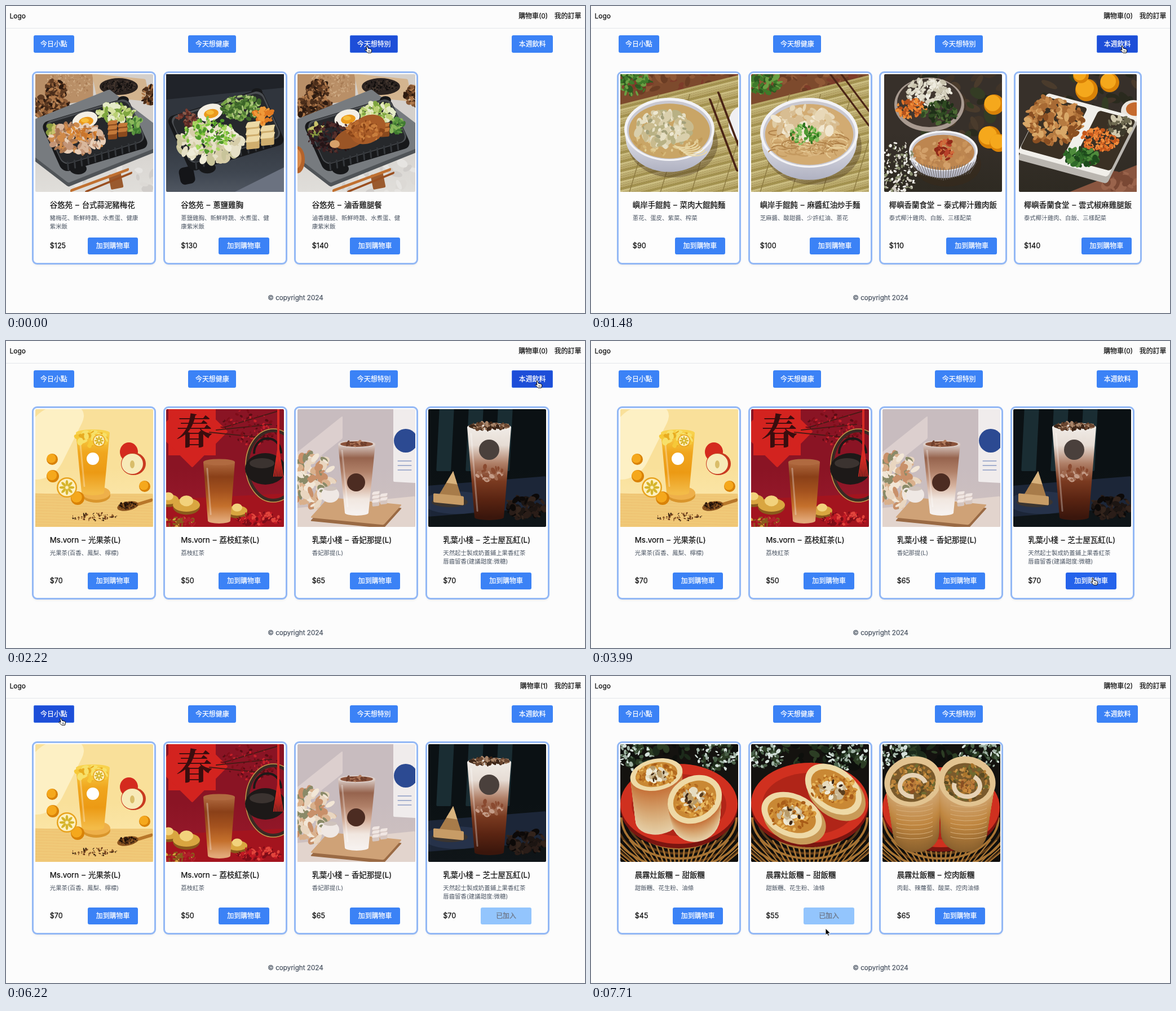
These frames come from a looping animation (1027x545 px, 8000 ms). An HTML page with a canvas:

```html
<!DOCTYPE html>
<html lang="zh-Hans">
<head>
<meta charset="utf-8">
<title>點餐</title>
<style>
html, body { margin: 0; width: 100%; height: 100%; overflow: hidden; background: #fcfcfc; }
* { box-sizing: border-box; }
#stage { position: fixed; inset: 0; overflow: hidden; color: #111; white-space: pre;
  font: 400 11.94px/20px Inter, "Noto Sans CJK SC", "Noto Sans CJK TC", sans-serif; -webkit-text-stroke: .25px; }
#stage.flat { background: linear-gradient(#fcfcfc 115px, #fff 115px); }
header { position: absolute; inset: 0 0 auto; height: 40px; padding: 7.5px 6.5px; display: flex; gap: 11.5px; border-bottom: 1px solid #e5e7eb; }
header :first-child { flex: 1; }
nav { position: absolute; left: 48.5px; width: 921.5px; top: 51.5px; display: flex; justify-content: space-between; }
.btn { background: #3b82f6; color: #fff; border-radius: 3px; text-align: center; }
nav .btn { padding: 0 12.5px; line-height: 31px; }
nav .on { background: #1d4ed8; box-shadow: inset 0 0 0 1px #3b6fe4; }
.row { display: flex; gap: 12.5px; margin: 115.5px 0 0 46px; }
.card { display: flex; flex-direction: column; align-items: center; min-width: 220px; padding: 2.5px 14.75px 15px;
  border: 3px solid #93b8f5; border-radius: 9px; background: #fdfdfd; box-shadow: 0 3px 4px -2px rgba(0,0,0,.08); }
.card canvas { margin: 0 -14.75px; }
.flat canvas { display: none; }
.info { min-width: 156.6px; }
.title { font-size: 13.43px; margin-top: 12.5px; word-spacing: 1.2px; }
.desc { font-size: 10.44px; line-height: 15px; height: 30px; margin: 6.5px 0 12px; color: #4b5563; -webkit-text-stroke: 0; }
.buy { display: flex; justify-content: space-between; line-height: 29.5px; }
.price { font-size: 12.6px; }
.buy .btn { width: 89.5px; }
.buy .on { background: #2563eb; }
.buy .done { background: #93c5fd; color: #6b7280; }
footer { margin-top: 21.5px; line-height: 77px; text-align: center; color: #4b5563; font-size: 11.7px; }
.flat footer { background: #f3f4f6; }
#tip { position: absolute; left: 0; top: 0; }
#tip svg { position: absolute; overflow: visible; }
</style>
</head>
<body>
<div id="stage"></div>
<script>
const stage = document.getElementById('stage');

function add(parent, tag, cls, text = '') {
  const el = document.createElement(tag);
  el.className = cls;
  el.textContent = text;
  parent.append(el);
  return el;
}

// ---- drawing helpers for the photos ----
const N = 209;
let c, seed;
const rnd = () => (seed = (seed * 16807) % 2147483647) / 2147483647;
const times = (n, f) => { for (let i = 0; i < n; i++) f(i); };
function E(fill, x, y, a, b = a, r = 0) {
  c.fillStyle = fill;
  c.beginPath();
  c.ellipse(x, y, a, b, r, 0, 7);
  c.fill();
}
// rounded box around x,y; ky and kx slant its sides
function Q(fill, x, y, w, h, ky = 0, kx = 0, round = 2) {
  c.save();
  c.transform(1, ky, kx, 1, x, y);
  c.fillStyle = fill;
  c.beginPath();
  c.roundRect(-w / 2, -h / 2, w, h, round);
  c.fill();
  c.restore();
}
function O(color, w, x, y, a, b = a, from = 0, to = 7) {
  c.strokeStyle = color;
  c.lineWidth = w;
  c.beginPath();
  c.ellipse(x, y, a, b, 0, from, to);
  c.stroke();
}
// scatter of small flecks inside an ellipse
function S(n, x, y, a, b, size, ...cols) {
  times(n, i => {
    const q = rnd() * 6.28, d = Math.sqrt(rnd()), s = size * (.5 + rnd() * .7);
    E(cols[i % cols.length], x + Math.cos(q) * a * d, y + Math.sin(q) * b * d, s, s * (.3 + rnd() * .5), rnd() * 3);
  });
}
function G(y0, y1, ...cols) {
  const g = c.createLinearGradient(0, y0, 0, y1);
  cols.forEach((k, i) => g.addColorStop(i / (cols.length - 1), k));
  return g;
}
const bg = (...cols) => Q(G(0, N, ...cols, cols[0]), N / 2, N / 2, N, N);
const fruit = (x, y, r) => { E('#d98207', x, y, r); E('#f5a81c', x - r * .15, y - r * .15, r * .8); };

// ---- boxed meals ----
const egg = (x, y) => {
  E('#f4efe4', x, y, 23, 15, -.3);
  E('#eb9a1c', x + 2, y + 2, 13, 8, -.2);
  E('#f6bd3c', x, y, 7, 4);
};
const cubes = (x, y, s, top, side) => times(5, i => {
  const cx = x + (i % 2 - .5) * s * 2, cy = y + (i - 2) * s * .5;
  Q(side, cx, cy, s * 1.8, s * 1.5, -.1);
  Q(top, cx, cy - s * .6, s * 1.8, s * .8, -.1, -.4);
});
function tray(x, y, k) {
  const q = (fill, dy, w, h) => Q(fill, x, y + dy, w * k, h * k, -.3, .45, 12);
  E('#17181a', x + 50 * k, y - 60 * k, 10, 7);
  E('#17181a', x - 30 * k, y + 62 * k, 15, 10);
  q('#17181a', 2, 154, 88);
  q('#4a4d51', -4, 148, 76);
  q('#26282b', -3, 144, 72);
  times(11, i => Q('#34373b', x + (i * 12 - 48) * k, y + (57 - i * 3.6) * k, 3, 16, 0, .1));
}
function desk() {
  bg('#d4d0cc', '#e0deda');
  S(40, 150, 170, 90, 50, 10, '#e6e4e1', '#d0cdca', '#dcd9d5');
  Q('#b98f67', 40, 20, 125, 70, -.15);
  S(150, 60, 18, 42, 22, 2, '#a87c55', '#caa57e', '#d0ae88');
  Q('#d3b48f', 152, 24, 95, 40, .1, .2);
  E('#2b2320', 148, 22, 34, 15);
  S(120, 148, 21, 29, 10, 2, '#0f0d0c', '#43362e');
  times(4, i => S(110, [36, 12, 43, 209][i], [28, 58, 60, 38][i], 18, 18, 5, '#4a2d1a', '#8a5a36', '#5d3a22', '#b07a4c', '#2c1a10'));
  Q('#505458', 95, 117, 190, 90, -.4, 1.3);
  Q('#777b7f', 95, 110, 190, 90, -.4, 1.3);
  Q('#9a5a2e', 143, 190, 22, 26, -.2, .2);
  Q('#c07030', 114, 188, 104, 5, -.37);
  Q('#9a4f20', 130, 192, 84, 4, -.41);
  tray(106, 106, 1);
  S(90, 142, 68, 32, 16, 6, '#b9cf72', '#d7e2a0', '#7fa63f', '#e6ebc8');
  S(50, 176, 90, 14, 14, 5, '#3f7a30', '#5a9440', '#8ab85a');
  cubes(146, 100, 9, '#c47a3a', '#8a4a1e');
  S(20, 34, 100, 13, 10, 6, '#c8c06a', '#8a9a40');
}
function pork() {
  desk();
  egg(88, 82);
  S(190, 74, 114, 48, 26, 7, '#d9b79c', '#c39577', '#e8cfb8', '#a9754f', '#cf8a4a');
  S(40, 82, 104, 26, 12, 4, '#c8742c', '#dd8e3a');
}
function leg() {
  desk();
  E('#b4632b', 0, 152, 13, 24);
  E('#d98a4a', -3, 150, 10, 18);
  egg(88, 78);
  S(200, 64, 112, 46, 26, 4, '#3a1f22', '#55302c', '#241416');
  E('#9a5526', 95, 113, 32, 17, -.4);
  E('#a85c28', 125, 98, 33, 24, -.5);
  S(110, 118, 101, 32, 18, 5, '#8a4519', '#b96a2e', '#c97e3d', '#a85c28');
  E('#d6a06a', 66, 124, 9, 7);
}
function breast() {
  bg('#30353d', '#3f4650', '#5f6672');
  Q('#6b7280', 190, 200, 150, 50, -.5);
  Q('#202329', 100, 10, 230, 50, -.1);
  Q('#141518', 37, 180, 26, 30, -.2, .2, 8);
  tray(106, 98, 1.1);
  S(60, 38, 78, 18, 14, 4, '#5a2a24', '#7a3c30', '#8a5a4a');
  egg(78, 68);
  S(160, 134, 60, 36, 22, 5, '#4f7a34', '#7aa64a', '#3c6428', '#a9c478');
  S(30, 172, 74, 17, 15, 7, '#e07a22', '#f09a3a');
  cubes(167, 110, 13, '#ecd9a6', '#cfae6e');
  S(150, 76, 122, 56, 34, 9, '#e6e0c6', '#d6cda8', '#f0ecd8', '#c8c49a');
  S(120, 76, 108, 46, 30, 4, '#7fc23c', '#a8d860', '#4f962a');
}

// ---- noodles and rice ----
function mat() {
  bg('#7d4a2d', '#6b3d24');
  S(60, 120, 15, 100, 28, 9, '#6b3d24', '#8f5836', '#7d3c2a');
  times(60, i => Q(['#b7a768', '#a3934f', '#cabd80', '#bcae70'][i % 4], 104, 30 + i * 4, 230, 4.2, -.25));
  times(4, i => Q('#8d7b42', 40 + i * 55, 130, 1.5, 190, 0, -.3));
  S(90, 18, 12, 36, 24, 6, '#3f7a2a', '#6aa043', '#2d5a20');
}
function bowl(x, y, a, b, fill) {
  E('rgba(60,40,20,.35)', x + 6, y + 24, a, b * 1.1);
  E(G(y, y + b * 1.5, '#e9e9f0', '#a9abbc'), x, y + b * .25, a * .97, b * 1.1);
  E('#f3f3f6', x, y, a, b);
  E('#c9c8d0', x, y + 1, a * .94, b * .93);
  E(fill, x, y + 3, a * .9, b * .87);
}
function soup() {
  mat();
  E('#f0eff2', 214, 88, 22, 30);
  times(2, i => Q('#4a2416', 183 + i * 15, 108 - i * 12, 4, 130, 0, .38));
  bowl(87, 98, 80, 56, '#c9a566');
  S(60, 85, 120, 60, 22, 5, '#e0cb94', '#d5b878', '#c19a58');
  S(110, 76, 96, 46, 30, 10, '#d9cfac', '#c9bb8e', '#e6dfc4', '#b8b184');
  S(30, 80, 90, 42, 24, 4, '#a3a07a', '#eee8d2');
  times(6, i => O('#ead9a8', 2, 112 + i * 4, 120 + i * 3, 22, 10, .2, 2.4));
}
function noodles() {
  mat();
  times(2, i => Q('#4a2416', 175 + i * 12, 46 - i * 10, 4, 95, 0, .75));
  bowl(103, 104, 87, 62, '#d2ab72');
  times(110, i => O(['#e6cb96', '#b0824a', '#d9b680', '#c49a60'][i % 4], 2, 46 + rnd() * 116, 104 + rnd() * 36, 8 + rnd() * 12, 4 + rnd() * 7, rnd() * 4, 6));
  S(100, 94, 86, 56, 28, 9, '#e8d8b8', '#f1e7d0', '#d8bd92', '#e0cca4');
  S(70, 95, 108, 26, 18, 4, '#4f9a32', '#2f7420', '#8cc465');
}
function shade() {
  bg('#37302a', '#2e2a22');
  S(60, 130, 50, 90, 70, 14, '#2a2a1e', '#4a3b2c', '#343c24', '#413428');
}
function coconut() {
  shade();
  E('#a89a90', 80, 54, 62, 48);
  E('#40362f', 80, 51, 57, 43);
  S(150, 78, 32, 40, 24, 5, '#e0dccc', '#d4cfbc', '#eeebdf', '#c8c2ac');
  S(90, 48, 62, 26, 18, 4, '#e0742a', '#f08f38', '#b5521c');
  S(90, 98, 68, 30, 20, 5, '#2f4a22', '#4d6a34', '#1f2f18');
  times(3, i => fruit(187 + i * 8, [112, 54, 122][i], 20 - i * 2));
  bowl(105, 136, 61, 36, '#bd8650');
  times(25, i => Q('#6b6664', 105 + (i - 12) * 4.4, 178 - Math.abs(i - 12), 1, 22, 0, (12 - i) * .05));
  S(70, 105, 139, 48, 25, 6, '#d2a06a', '#b9824e', '#c9935a');
  S(40, 108, 134, 15, 18, 5, '#8f2a18', '#b8402a', '#d06a3a');
  S(170, 26, 168, 32, 50, 3, '#f2f0ea', '#cfcabf', '#8a9070');
}
function pepper() {
  shade();
  Q('#8a5640', 175, 200, 170, 50, -.4);
  S(30, 180, 190, 35, 16, 10, '#7a4834', '#9a644c');
  times(3, i => fruit([120, 161, 110][i], 28 - i * 13, 20 - i * 3));
  E('#e9e4dd', 203, 66, 22, 20);
  E('#c56a2e', 206, 62, 16, 12);
  Q('#bab6b0', 104, 118, 160, 110, .27, -.5, 5);
  Q('#f1efea', 104, 108, 160, 106, .27, -.5, 5);
  Q('#3a3024', 62, 96, 74, 92, .27, -.5, 5);
  Q('#3a3024', 152, 118, 66, 90, .27, -.5, 5);
  S(190, 62, 82, 50, 42, 8, '#a86a34', '#c88a4c', '#8a4f22', '#d9a868', '#b57a40');
  S(130, 144, 116, 34, 20, 4, '#e0702a', '#f28d3c', '#c4571c');
  S(90, 112, 148, 30, 17, 6, '#2f6a28', '#4f8c3c', '#1d4a1c');
  S(50, 180, 92, 22, 16, 6, '#3e3a2c', '#6f6a50', '#d0c8ac');
}

// ---- drinks ----
function cup(x, y, a, b, h, ...cols) {
  c.fillStyle = G(y, y + h, ...cols);
  c.beginPath();
  c.moveTo(x - a, y);
  c.lineTo(x + a, y);
  c.lineTo(x + b, y + h);
  c.ellipse(x, y + h, b, 5, 0, 0, Math.PI);
  c.fill();
  E(cols[0], x, y, a, a * .2);
  Q('rgba(255,255,255,.3)', x - (a + b) / 2 + 6, y + h / 2, 3, h - 20, 0, (a - b) / h);
}
function slice(x, y, r) {
  E('#e8a21c', x, y, r);
  E('#fdf0c0', x, y, r * .86);
  times(8, i => E('#d6b42a', x + Math.cos(i * .785) * r * .44, y + Math.sin(i * .785) * r * .44, r * .3, r * .13, i * .785));
}
function juice() {
  bg('#f9e09a', '#fbe7ab', '#f5d080');
  Q('#f0c978', 104, 180, 209, 60);
  times(12, i => Q('#eec070', 104, 153 + i * 5, 209, 1, .03));
  Q('#fdf0c4', 20, 60, 90, 130, 0, -.5, 30);
  E('#d9952c', 108, 153, 25, 13);
  E('#eeb04a', 108, 149, 25, 12);
  cup(102, 42, 30, 20, 106, '#f8d24c', '#f0a61e', '#ec9a14', '#f3bb48');
  S(45, 102, 52, 27, 14, 6, '#f7e06a', '#e8ac20', '#f6c838');
  slice(113, 56, 11);
  E('#fff', 102, 88, 11);
  E('#d42a1e', 166, 76, 16, 17);
  E('#c93a20', 174, 97, 22, 20);
  E('#f7eab8', 172, 97, 19, 18);
  E('#d9bd6a', 172, 98, 4, 7);
  times(4, i => fruit([30, 31, 75, 194][i], [89, 119, 158, 137][i], 10 + i % 3));
  slice(56, 139, 18);
  Q('#b8772a', 188, 167, 40, 6, -.3);
  E('#8a5420', 164, 172, 19, 8, -.2);
  S(60, 164, 171, 16, 6, 2, '#3a2010', '#1c0f08');
  S(70, 105, 191, 42, 7, 2, '#6a3a1c', '#8c5a2a', '#3a2412');
}
function lychee() {
  bg('#8a1424', '#96182a', '#8a1220');
  Q('#a3141e', 104, 185, 209, 60, -.05);
  Q('#d3231f', 46, 40, 84, 84, 0, 0, 0);
  c.save();
  c.translate(46, 40);
  c.rotate(.78);
  Q('#d3231f', 0, 0, 90, 90);
  c.restore();
  c.fillStyle = '#3a0d0e';
  c.font = '700 64px "Noto Serif CJK SC", "Noto Sans CJK SC", serif';
  c.textAlign = 'center';
  c.fillText('春', 50, 62);
  times(3, i => Q('#4a1a16', 150 - i * 12, 18 + i * 14, 100, 2, -.3 + i * .2));
  S(90, 148, 32, 50, 32, 3, '#c5202a', '#7d0d18', '#5a0d14');
  O('#3a2a24', 6, 190, 100, 46, 62);
  O('#c49a4a', 1.5, 190, 100, 49, 65);
  E('#1d1918', 176, 106, 36, 28);
  E('#3b3330', 170, 96, 22, 9);
  O('#1d1918', 4, 180, 78, 24, 26, 3.1, 6.3);
  times(7, i => Q('#d82a24', 199 + (i - 3) * 1.5, 94, 1.6, 52, 0, (i - 3) * .05));
  Q('#d82a24', 199, 35, 4, 80);
  times(3, i => {
    const x = [4, 36, 126][i], y = 160 + i * 10, r = 18 + i % 2 * 6;
    E('#8a5a1c', x, y + 3, r, r * .6);
    E('#d9a640', x, y, r, r * .5);
    E('#f2d27c', x, y - r * .3, r * .5, r * .4);
  });
  S(80, 165, 195, 40, 12, 4, '#c21a24', '#7d0d18', '#e2453c');
  S(60, 20, 202, 32, 10, 4, '#d9a640', '#8a5a1c', '#b0202a');
  cup(94, 94, 28, 20, 104, '#b06a40', '#8a4018', '#a4521e', '#c4702c', '#e2a878');
}
function latte() {
  bg('#c8bcbf', '#cdc0c0', '#d8c9c4');
  Q('#dccfce', 20, 80, 120, 40, -.8);
  Q('#e2d4cd', 104, 195, 209, 60, -.1);
  S(120, 24, 126, 38, 46, 9, '#e9d6c0', '#d9b08c', '#f2e6d6', '#8a8a68', '#c8906a');
  Q('#f0ecec', 191, 64, 42, 132, .05);
  E('#2c4a92', 192, 56, 21);
  times(3, i => Q('#8a9ac4', 190, 92 + i * 8, 25, 1.5));
  Q('#9a6a44', 104, 187, 130, 36, .1, -.9);
  Q('#cfa277', 104, 181, 130, 36, .1, -.9);
  O('#efe8e4', 3, 43, 150, 7, 9);
  E('#efe8e4', 58, 152, 16, 14);
  E('#cfc3bc', 58, 141, 12, 4);
  cubes(146, 160, 7, '#f0e6e2', '#d6c6c0');
  cup(105, 62, 33, 21, 122, '#ddd0cb', '#96644e', '#b08068', '#d4b09c', '#f1e7e0', '#f6f1ee');
  E('#8a523a', 105, 62, 29, 5);
  S(20, 105, 62, 22, 4, 4, '#b07a5c', '#6f3f2c');
  E('#4c2c22', 104, 130, 16);
}
function cocoa() {
  bg('#0b1114', '#0e1416', '#10151a');
  times(3, i => Q('#1a2d33', 30 + i * 52, 54, 26, 112, 0, -.05));
  Q('#1c2638', 104, 155, 209, 55, -.08);
  E('#26324a', 50, 166, 60, 20);
  E('#3b3530', 38, 165, 32, 9);
  times(24, i => Q(i < 12 ? '#d9b37e' : '#a87c4a', 44 - i * .2, 112 + i * 1.8, 2 + i * 1.6, 3, .15));
  Q('#c79c66', 36, 160, 54, 16, .1);
  S(90, 174, 174, 34, 20, 7, '#1c1512', '#33241c', '#0c0908', '#2a1d18');
  cup(108, 32, 39, 26, 160, '#f0ebe6', '#e6dcd4', '#b08068', '#7a3a20', '#5a2412', '#3a160c');
  S(90, 108, 30, 34, 6, 4, '#6a4630', '#3d2618', '#a88468');
  S(26, 108, 112, 26, 14, 6, '#a06a50', '#8a4a30', '#c49c88');
  E('#4a403c', 108, 72, 18);
}

// ---- rice rolls ----
function plate(y) {
  bg('#14120f', '#0e0d0b');
  S(70, 110, 20, 110, 30, 9, '#1c2a1a', '#2c3d24', '#0d0f0c');
  times(2, i => S(70, 20 + i * 152, 20, 38, 26, 4, '#d4e0da', '#9fb2a4', '#4a6048'));
  times(7, i => O(i % 2 ? '#a87434' : '#5c3a18', 4, 104, 130, 72 + i * 10, 46 + i * 9, 0, 3.14));
  times(26, i => Q('#a87434', 104 + (i - 13) * 9, 190, 3, 40, 0, (13 - i) * .1));
  E('#7a1510', 104, y + 7, 104, 72);
  E('#d0301f', 104, y, 104, 71);
  E('#b02518', 104, y + 2, 84, 55);
}
function face(x, y, a, b, r) {
  E('#eed9a6', x, y, a, b, r);
  E('#c98834', x, y, a * .8, b * .76, r);
  S(120, x, y, a * .72, b * .68, 4, '#d99a3c', '#b56c20', '#e8b860', '#a85c18');
  S(30, x, y, a * .42, b * .42, 6, '#e6dcc0', '#cbb894', '#f0ead6', '#b89a68');
  S(6, x, y, a * .36, b * .36, 4, '#5c3d1c', '#3a2412');
}
function roll(x, y, a, b, h, r) {
  times(h, i => E(`hsl(${38 - 14 * i / h},55%,${78 - 28 * i / h}%)`, x + (h - i) * .05, y + h - i, a * (1 - .12 * (h - i) / h), b, r));
  face(x, y, a, b, r);
}
function sweet() {
  plate(106);
  roll(64, 54, 47, 28, 78, -.2);
  roll(132, 98, 50, 41, 34, -.5);
}
function large() {
  plate(104);
  times(2, i => {
    const x = 146 - i * 74, y = 80 + i * 46, r = .65 - i * .25;
    E('#c89a58', x + 5, y + 9, 58, 40, r);
    face(x, y, 56, 38, r);
  });
}
function braised() {
  plate(112);
  times(2, i => {
    const x = 54 + i * 96, y = 66, side = i * 2 - 1;
    times(92, k => E(`hsl(33,50%,${36 + k * .3}%)`, x - side * (92 - k) * .06, y + 92 - k, 50 - (92 - k) * .1, 34));
    times(9, k => O('#d8b07c', 1, x, 92 + k * 8, 40, 12, .5, 2.4));
    E('#e2c390', x, y, 51, 44, side * .25);
    E('#7a5a2c', x, y + 2, 41, 34, side * .25);
    S(150, x, y + 2, 38, 31, 4, '#a8742c', '#5a4a22', '#c99448', '#6f6a30', '#b88038');
    O('#e6d2b4', 8, x, y + 8, 23, 19, 1.5 - i * 2.5, 6 - i * 2.6);
    S(40, x, y + 8, 14, 11, 4, '#b87a3a', '#8a4f22', '#c98a3c');
  });
}

// ---- menus: name, details, price, photo ----
const menus = [
  [['谷悠苑 – 台式蒜泥豬梅花', '豬梅花、新鮮時蔬、水煮蛋、健康\n紫米飯', 125, pork],
   ['谷悠苑 – 蔥鹽雞胸', '蔥鹽雞胸、新鮮時蔬、水煮蛋、健\n康紫米飯', 130, breast],
   ['谷悠苑 – 滷香雞腿餐', '滷香雞腿、新鮮時蔬、水煮蛋、健\n康紫米飯', 140, leg]],
  [['嶼岸手餛飩 – 菜肉大餛飩麵', '蔥花、蛋皮、紫菜、榨菜', 90, soup],
   ['嶼岸手餛飩 – 麻醬紅油炒手麵', '芝麻醬、酸甜醬、少許紅油、蔥花', 100, noodles],
   ['椰嶼香蘭食堂 – 泰式椰汁雞肉飯', '泰式椰汁雞肉、白飯、三樣配菜', 110, coconut],
   ['椰嶼香蘭食堂 – 雲式椒麻雞腿飯', '泰式椰汁雞肉、白飯、三樣配菜', 140, pepper]],
  [['Ms.vorn – 光果茶(L)', '光果茶(百香、鳳梨、檸檬)', 70, juice],
   ['Ms.vorn – 荔枝紅茶(L)', '荔枝紅茶', 50, lychee],
   ['乳葉小棧 – 香妃那提(L)', '香妃那提(L)', 65, latte],
   ['乳葉小棧 – 芝士屋瓦紅(L)', '天然起士製成奶蓋鋪上果香紅茶\n唇齒留香(建議甜度:微糖)', 70, cocoa]],
  [['晨霧灶飯糰 – 甜飯糰', '甜飯糰、花生粉、油條', 45, sweet],
   ['晨霧灶飯糰 – 甜飯糰', '甜飯糰、花生粉、油條', 55, large],
   ['晨霧灶飯糰 – 焢肉飯糰', '肉鬆、辣蘿蔔、酸菜、焢肉油條', 65, braised]]
];

const head = add(stage, 'header', '');
const [, cart] = ['Logo', '', '我的訂單'].map(s => add(head, 'div', '', s));
const bar = add(stage, 'nav', '');
const tabs = ['今日小點', '今天想健康', '今天想特別', '本週飲料'].map(s => add(bar, 'div', 'btn', s));

const pages = menus.map(items => {
  const row = add(stage, 'div', 'row');
  const buttons = items.map(([name, text, price, paint], i) => {
    const card = add(row, 'div', 'card');
    const pic = add(card, 'canvas', '');
    pic.width = pic.height = N;
    c = pic.getContext('2d');
    seed = 77 + i;
    paint();
    const info = add(card, 'div', 'info');
    add(info, 'div', 'title', name);
    add(info, 'div', 'desc', text);
    const buy = add(info, 'div', 'buy');
    add(buy, 'div', 'price', '$' + price);
    return add(buy, 'div', 'btn');
  });
  return { row, buttons };
});
add(stage, 'footer', '', '© copyright 2024');

const tip = add(stage, 'div', '');
tip.id = 'tip';
tip.innerHTML = `<svg width="18" height="20" style="left:-4px;top:-1px" stroke-linejoin="round">
<path d="M3 2.2Q3-.2 4.6.8L6.4 5.2 10.5 6.2Q13 6.8 12.6 9L11.6 13.2H5.8L1 8.4Q.6 6.8 2.2 7.2L4 8.4Z" fill="#fff" stroke="#000"/>
<path d="M7.2 8.4v3M9.4 8.6v2.8" stroke="#000" stroke-width=".8"/></svg>
<svg width="18" height="20"><path d="M0 0V12L2.8 9.5 4.6 13.4 6.6 12.5 4.9 8.7H8.6Z" stroke="#fff" stroke-width=".9"/></svg>`;
const [hand, arrow] = tip.children;

// ---- timeline ----
const STEP = 145;
// pointer moves: start, number of steps, end point
const moves = [[1190, 3, 942, 71], [2670, 8, 766, 427], [3840, 2, 890, 421], [5330, 7, 97, 75], [6670, 4, 416, 428]];
const ease = p => p * p * (3 - 2 * p);
function pointer(t) {
  let x = 640, y = 71;
  for (const [from, n, tx, ty] of moves) {
    if (t < from) break;
    const p = ease(Math.min(1, (Math.floor((t - from) / STEP) + 1) / n));
    x += (tx - x) * p;
    y += (ty - y) * p;
  }
  return [x, y];
}
const passed = (t, ...marks) => marks.filter(m => t >= m).length;

function draw(t) {
  const [x, y] = pointer(t);
  const scene = passed(t, 890, 2080, 6370), count = passed(t, 5030, 7710);
  const { buttons } = pages[scene];
  const bought = [pages[2].buttons[3], pages[3].buttons[1]].slice(0, count);
  stage.className = t >= 2080 && t < 2220 ? 'flat' : '';
  cart.textContent = `購物車(${count})`;
  pages.forEach((p, i) => p.row.style.display = i === scene ? '' : 'none');
  for (const b of buttons) {
    const done = bought.includes(b);
    b.classList.toggle('done', done);
    b.textContent = done ? '已加入' : '加到購物車';
  }
  let over = false;
  for (const b of [...tabs, ...buttons]) {
    const r = b.getBoundingClientRect();
    const on = !bought.includes(b) && x >= r.left && x < r.right && y >= r.top && y < r.bottom;
    b.classList.toggle('on', on);
    over = over || on;
  }
  hand.style.display = over ? '' : 'none';
  arrow.style.display = over ? 'none' : '';
  tip.style.transform = `translate(${x}px,${y}px)`;
}

const start = performance.now();
function tick() {
  draw((performance.now() - start) % 8000);
  requestAnimationFrame(tick);
}
tick();
</script>
</body>
</html>
```
